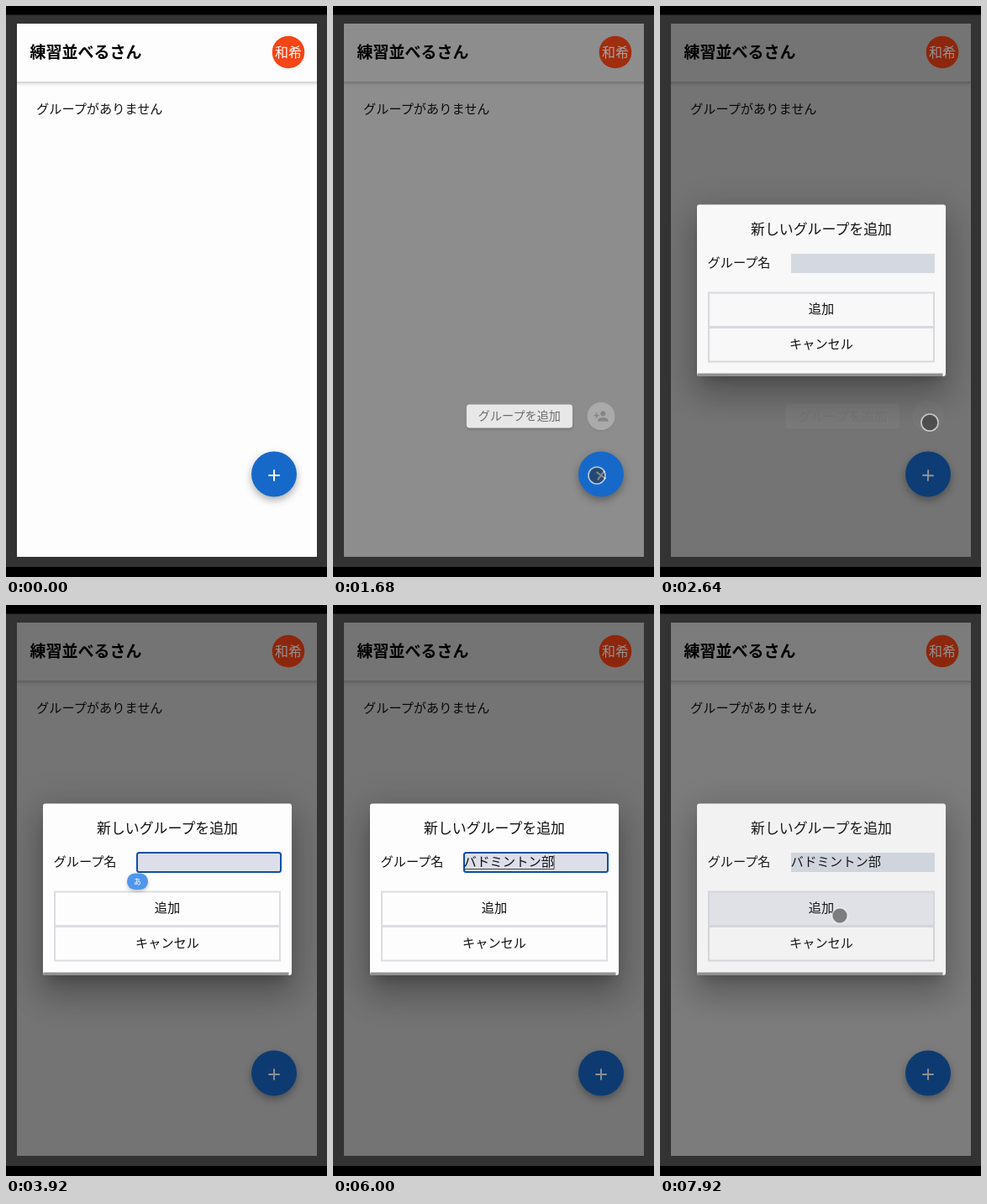
An HTML page that plays this animation: 382x680 px, repeating every 8 s.

```html
<!DOCTYPE html>
<html lang="ja">
<head>
<meta charset="utf-8">
<title>グループ追加</title>
<style>
html, body { margin: 0; width: 100%; height: 100%; overflow: hidden; background: #000; }
svg { display: block; width: 382px; height: 680px; }
text { font: 15.2px "Noto Sans CJK JP", "Noto Sans CJK", sans-serif; fill: #111; }
.mid { text-anchor: middle; }
.soft { filter: drop-shadow(0 2px 2px rgba(0,0,0,.22)); }
#fab { filter: drop-shadow(0 4px 5px rgba(0,0,0,.32)); }
.button { stroke: #dcdde2; stroke-width: 2; }
</style>
</head>
<body>
<svg viewBox="0 0 382 680">
  <defs><clipPath id="pageClip"><rect x="13" y="21" width="357" height="635"/></clipPath></defs>
  <rect y="10.5" width="382" height="657.5" fill="#333"/>
  <g clip-path="url(#pageClip)">
    <rect x="13" y="21" width="358" height="636" fill="#fdfdfd"/>
    <rect class="soft" x="3" y="21" width="378" height="69" fill="#fdfdfd"/>
    <text x="28.5" y="61.5" style="font-size:19px;font-weight:700;fill:#000">練習並べるさん</text>
    <text x="36" y="128.2">グループがありません</text>
    <rect id="shade" x="3" y="11" width="378" height="656"/>
    <circle cx="336" cy="55" r="19.3" fill="#f64516"/>
    <text class="mid" x="336" y="61.3" style="font-size:16px;fill:#fff">和希</text>
    <circle id="avatarDim" cx="336" cy="55" r="19.3"/>

    <g id="label">
      <rect class="soft" x="149.5" y="473.5" width="135.5" height="30" rx="4" fill="#fcfcfc"/>
      <text x="164.5" y="493.6" style="fill:#666">グループを追加</text>
    </g>
    <g id="action">
      <circle id="actionFace" class="soft" r="19"/>
      <path transform="scale(.9) translate(-12 -12)" fill="#757575" d="M15 12c2.21 0 4-1.79 4-4s-1.79-4-4-4-4 1.79-4 4 1.79 4 4 4zm-9-2V7H4v3H1v2h3v3h2v-3h3v-2H6zm9 4c-2.67 0-8 1.34-8 4v2h16v-2c0-2.66-5.33-4-8-4z"/>
    </g>
    <g id="fab">
      <circle cx="319" cy="557.5" r="27" fill="#1769c9"/>
      <path id="plus" d="M-6.7 0H6.7M0-6.7V6.7" stroke="#fff" stroke-width="1.9"/>
      <circle id="fabDim" cx="319" cy="557.5" r="27"/>
    </g>

    <g id="dialog">
      <rect x="36" y="237" width="312" height="221" style="filter:blur(23px);opacity:.14"/>
      <rect x="41" y="257" width="302" height="211" style="filter:blur(19px);opacity:.17"/>
      <rect x="51" y="254" width="282" height="191" style="filter:blur(7.5px);opacity:.22"/>
      <rect x="44" y="236.4" width="296" height="204.6" rx="3" fill="#fdfdfd"/>
      <rect x="44.5" y="437.5" width="292" height="3.5" fill="#929292"/>
      <text class="mid" x="192" y="272" style="font-size:16.9px">新しいグループを追加</text>
      <text x="56.5" y="310.8">グループ名</text>
      <rect id="field" x="156" y="295" width="171" height="23"/>
      <text id="value" x="155.5" y="310.8" style="font-size:15.3px"></text>
      <path id="compose" stroke="#444" fill="none"/>
      <rect id="addButton" class="button" x="58" y="341.5" width="268" height="40.5"/>
      <rect class="button" x="58" y="383" width="268" height="40.5" fill="none"/>
      <text class="mid" x="192" y="366.3">追加</text>
      <text class="mid" x="192" y="408.3">キャンセル</text>
    </g>
    <g id="badge">
      <rect class="soft" x="144" y="319.5" width="25" height="19.5" rx="9.5" fill="#4f96ec"/>
      <text class="mid" x="156.5" y="333" style="font-size:9px;fill:#fff">あ</text>
    </g>
    <circle id="cursor" r="10" fill="#323232" fill-opacity=".57" stroke="#fff" stroke-opacity=".65" stroke-width="1.6"/>
  </g>
</svg>
<script>
const LOOP = 8000, STEP = 80;
const $ = id => document.getElementById(id);
const set = (id, attrs) => {
  for (const name in attrs) $(id).setAttribute(name, attrs[name]);
};
const ease = (t, from, to) => {
  const p = Math.min(1, Math.max(0, (t - from) / (to - from)));
  return p * p * (3 - 2 * p);
};

const typed = [
  [4080, "b"], [4160, "ば"], [4240, "ばd"], [4320, "ばど"],
  [4480, "ばどm"], [4560, "ばどみ"], [4720, "ばどみn"],
  [4960, "ばどみんt"], [5120, "ばどみんと"], [5520, "バドミント"],
  [5680, "バドミントn"], [5840, "バドミントンb"],
  [5920, "バドミントンぶ"], [6000, "バドミントン部"]
];

// Pointer stops: time, x, y
const stops = [
  [1040, 345, 650], [1360, 314, 559], [1840, 314, 559], [2320, 321, 496],
  [2640, 321, 496], [3200, 250, 306], [7040, 250, 306], [7600, 214, 370], [LOOP, 214, 370]
];

function pointer(t) {
  const i = stops.findIndex(s => t < s[0]);
  if (i < 1) return stops[0].slice(1);
  const [a, b] = [stops[i - 1], stops[i]], p = ease(t, a[0], b[0]);
  return [1, 2].map(k => a[k] + (b[k] - a[k]) * p);
}

const scaleAt = (x, y, s) => `translate(${x} ${y}) scale(${s}) translate(${-x} ${-y})`;

function draw(t) {
  const opening = ease(t, 1520, 1740), closing = ease(t, 2480, 2660);
  const clicked = t >= 7920, focused = t >= 3360 && !clicked;

  set("shade", { opacity: (clicked ? .51 : .54) * opening });
  set("avatarDim", { opacity: .43 * opening });
  set("fabDim", { opacity: .44 * closing });
  set("plus", { transform: `translate(319 559) rotate(${45 * (opening - closing)})` });

  set("label", {
    opacity: opening * (1 - closing),
    transform: scaleAt(285, 488.5, .62 + .38 * opening)
  });
  const pop = ease(t, 1640, 1760);
  set("action", {
    opacity: pop * (1 - closing),
    transform: `translate(319 488.5) scale(${.82 + .18 * pop})`
  });
  set("actionFace", { fill: t >= 2320 ? "#cfcfcf" : "#fdfdfd" });

  set("dialog", { opacity: clicked ? .92 : closing });
  set("field", focused
    ? { rx: 2.5, fill: "#dcdfea", stroke: "#0f4f9f", "stroke-width": 2 }
    : { rx: 0, fill: "#d8dde6", stroke: "none" });
  set("addButton", { fill: clicked ? "#e9eaef" : "none" });

  const entry = typed.filter(e => t >= e[0]).pop();
  $("value").textContent = entry ? entry[1] : "";
  const end = 155.5 + (entry ? $("value").getComputedTextLength() : 0);
  set("compose", {
    d: `M156 314.5H${end}V298`,
    visibility: entry && t < 6480 ? "visible" : "hidden"
  });
  set("badge", { opacity: t >= 3920 && t < 4080 ? 1 : 0 });

  const [x, y] = pointer(t);
  const shown = t >= 1040 && t < 3520 || t >= 7120;
  set("cursor", { cx: x, cy: y, opacity: shown ? 1 : 0, r: clicked ? 9.3 : 10 });
}

const start = performance.now();
function tick() {
  const t = (performance.now() - start) % LOOP;
  draw(Math.floor(t / STEP) * STEP);
  requestAnimationFrame(tick);
}
tick();
</script>
</body>
</html>
```
